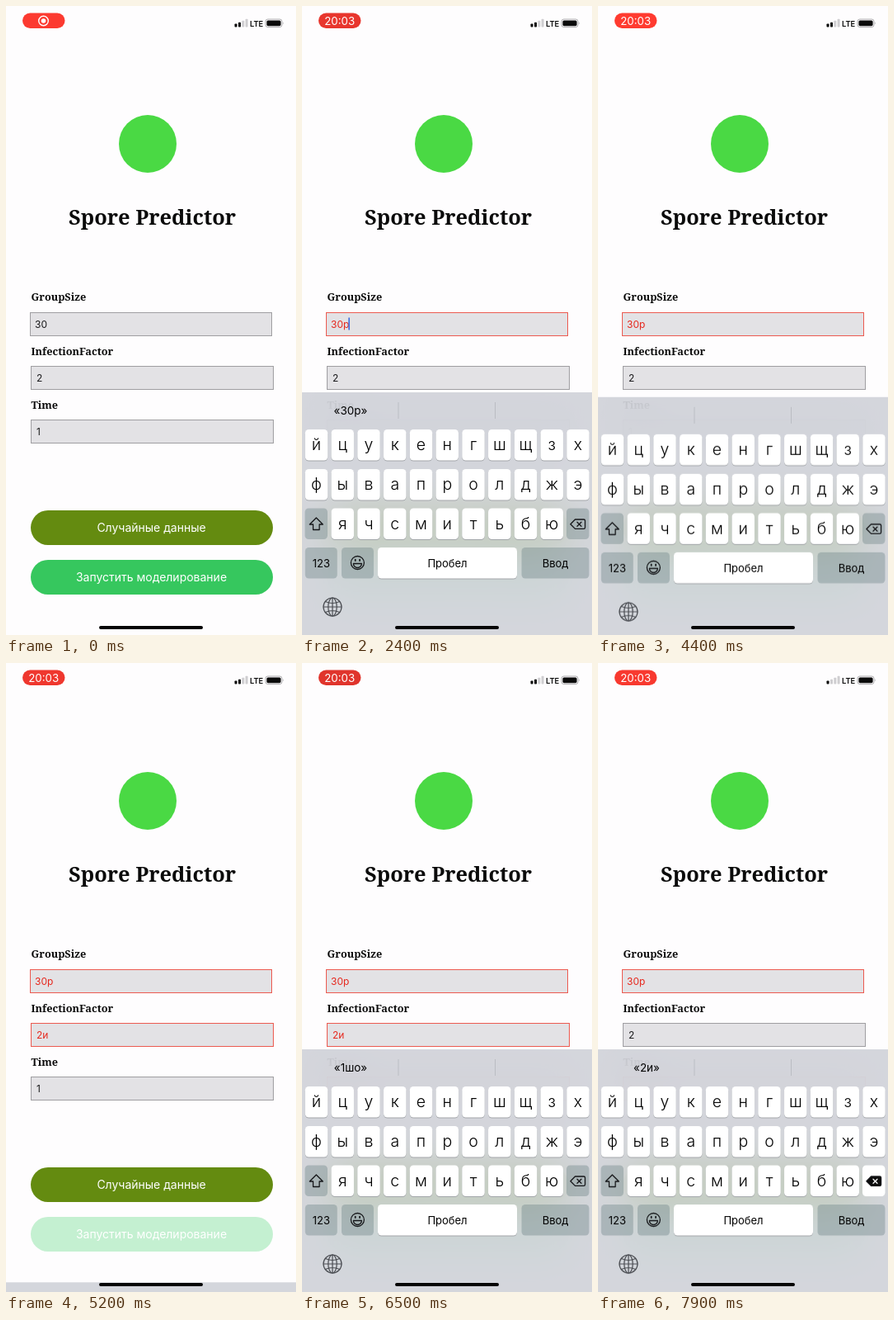
An HTML page that plays this animation: 352x762 px, repeating every 8 s.

```html
<!DOCTYPE html>
<html lang="ru">
<head>
<meta charset="utf-8">
<title>Spore Predictor</title>
<style>
  html, body { margin: 0; width: 100%; height: 100%; overflow: hidden; background: #fefdfe; }
  #stage { position: relative; width: 352px; height: 762px; overflow: hidden; background: #fefdfe; }
  svg { position: absolute; left: 0; top: 0; display: block; }
  text { font-family: Inter, Roboto, sans-serif; }
  .slab { font-family: "Noto Serif", serif; font-weight: 600; fill: #0b0b0b; }
  .label { font-size: 12.7px; }
  .mid { text-anchor: middle; }
  .field rect { fill: #e3e2e5; stroke: #9f9ea1; }
  .field text { font-size: 12px; fill: #1a1a1c; }
  .field.bad rect { stroke: #ec5a50; }
  .field.bad text { fill: #e6281e; }
  .button { font-size: 14px; fill: #fff; }
  #keyboard {
    position: absolute; left: 0; top: 468px; width: 352px; height: 294px;
    background: rgba(205, 208, 215, .86);
    -webkit-backdrop-filter: blur(26px) saturate(1.6);
    backdrop-filter: blur(26px) saturate(1.6);
  }
  .key { fill: #fff; }
  .dim { fill: rgba(104, 124, 132, .37); }
  .shade { fill: #a3a6aa; }
  .letter { font-size: 19.5px; font-weight: 350; }
  .word { font-size: 13px; }
  .line { fill: none; stroke: #16171a; stroke-width: 1.3; stroke-linejoin: round; stroke-linecap: round; }
  .globe { stroke: #4a4d52; stroke-width: 1.2; }
</style>
</head>
<body>
<div id="stage">
  <svg width="352" height="762">
    <rect id="pill" x="20" y="8.500" width="51.5" height="18.5" rx="9.2"/>
    <g id="recIcon">
      <circle cx="45.5" cy="18" r="5.8" fill="none" stroke="#fff" stroke-width="1.4"/>
      <circle cx="45.5" cy="18" r="2.8" fill="#fff"/>
    </g>
    <text id="clock" class="mid" x="45.7" y="22.700" font-size="13.3" fill="#fff">20:03</text>

    <g fill="#0b0b0b">
      <rect x="277.5" y="21.5" width="3" height="4" rx=".8"/>
      <rect id="bar2" x="282" y="19.7" width="3" height="5.8" rx=".8"/>
      <rect x="286.3" y="17.8" width="3" height="7.7" rx=".8" fill="#cfced1"/>
      <rect x="290.6" y="15.8" width="3" height="9.7" rx=".8" fill="#cfced1"/>
      <text x="296" y="25" font-size="9.3" font-weight="600">LTE</text>
      <rect x="315" y="16" width="20" height="9.6" rx="2.8" fill="none" stroke="#a4a3a6" stroke-width=".9"/>
      <rect x="316.4" y="17.4" width="17.2" height="6.8" rx="1.6"/>
      <path d="M336 19.2q1.4 1.6 0 3.2z" fill="#a4a3a6"/>
    </g>

    <circle cx="172" cy="167" r="35" fill="#4ad944"/>
    <text class="slab mid" x="177.5" y="265" font-size="25.4">Spore Predictor</text>

    <text class="slab label" x="30.5" y="357">GroupSize</text>
    <text class="slab label" x="30.5" y="423">InfectionFactor</text>
    <text class="slab label" x="30.5" y="488">Time</text>
    <g class="field"><rect x="29.5" y="371.5" width="293" height="28"/><text x="35" y="390"></text></g>
    <g class="field"><rect x="30.5" y="436.5" width="294" height="28"/><text x="37" y="455"></text></g>
    <g class="field"><rect x="30.5" y="501.5" width="294" height="28"/><text x="37" y="520"></text></g>
    <rect id="caret" width="1.6" height="15" fill="#3d6be0"/>

    <rect x="30" y="611" width="294" height="42" rx="21" fill="#648b10"/>
    <text class="button mid" x="176.5" y="637">Случайные данные</text>
    <rect id="start" x="30" y="671" width="294" height="42" rx="21"/>
    <text class="button mid" x="176.5" y="697">Запустить моделирование</text>
  </svg>

  <div id="keyboard">
    <svg width="352" height="294">
      <path d="M117 12v20M234.5 12v20" stroke="#babdc3"/>
      <text id="hint" class="mid" x="59" y="26.5" font-size="13.5"></text>
      <g id="keys"></g>
      <path class="line" d="M17.3 152l-8 8h4.2v6.5h7.6v-6.5h4.2z"/>
      <path id="eraser" class="line" d="M331.5 154h10.5q1.6 0 1.6 1.6v8.2q0 1.6-1.6 1.6h-10.5l-5.6-5.7z"/>
      <path id="cross" class="line" d="M334 157.2l5 5m0-5l-5 5"/>
      <g class="line">
        <circle cx="67.4" cy="206.5" r="8"/>
        <path d="M62.4 207.5h10a5 5 0 0 1-10 0z"/>
        <path d="M64.7 202.7v1.2M70.1 202.7v1.2" stroke-width="1.8"/>
      </g>
      <g class="line globe">
        <circle cx="37" cy="260" r="11"/>
        <ellipse cx="37" cy="260" rx="5.2" ry="11"/>
        <path d="M37 249v22M26 260h22M28.5 253.500q8.500 4 17 0M28.500 266.500q8.500-4 17 0"/>
      </g>
    </svg>
  </div>

  <svg width="352" height="762">
    <rect x="113" y="751" width="126" height="4" rx="2" fill="#050505"/>
  </svg>
</div>

<script>
const LOOP = 8000, TRAVEL = 294, SPRING = 0.02;
const $ = id => document.getElementById(id);

// Keyboard layout
let keys = '';
function addKey(x, y, w, label = '', cls = 'letter', dim = false) {
  const id = label === 'erase' ? ' id="eraseKey"' : '';
  const text = label === 'erase' ? '' : label;
  if (!dim) keys += `<rect class="shade" x="${x}" y="${y + 1}" width="${w}" height="37.5" rx="4.5"/>`;
  keys += `<rect${id} class="${dim ? 'dim' : 'key'}" x="${x}" y="${y}" width="${w}" height="37.5" rx="4.5"/>`;
  keys += `<text class="mid ${cls}" x="${x + w / 2}" y="${y + (cls === 'letter' ? 25 : 23.5)}">${text}</text>`;
}
const addRow = (letters, first, y) =>
  [...letters].forEach((c, i) => addKey(3.8 + 31.75 * (first + i), y, 27.4, c));
addRow('йцукенгшщзх', 0, 45);
addRow('фывапролджэ', 0, 93);
addRow('ячсмитьбю', 1, 140.5);
addKey(3.5, 140.5, 27.5, '', 'word', true);
addKey(321, 140.5, 27.5, 'erase', 'word', true);
addKey(3.8, 188, 39, '123', 'word', true);
addKey(48, 188, 39, '', 'word', true);
addKey(92, 188, 169, 'Пробел', 'word');
addKey(266.5, 188, 82, 'Ввод', 'word', true);
$('keys').innerHTML = keys;

// Timeline: [time, value]
const slides = [[910, 1], [2675, 0], [4108, 1], [4950, 0], [5620, 1], [6710, 0], [7350, 1]];
const values = [
  [[0, '30'], [1950, '30р']],
  [[0, '2'], [4650, '2и'], [7800, '2']],
  [[0, '1'], [6150, '1ш'], [6350, '1шо']]
];
const hints = [[0, ''], [1950, '«30р»'], [2900, ''], [4650, '«2и»'], [5400, ''],
  [6150, '«1ш»'], [6350, '«1шо»'], [7150, ''], [7400, '«2и»']];
const focus = [[0, -1], [910, 0], [2675, -1], [4450, 1], [4950, -1], [7350, 1]];
const glow = [[0, .9], [500, 1], [900, 1], [1300, 0], [2900, .5], [4400, 1],
  [5800, .2], [7100, .05], [7900, .8], [8000, .9]];

const entry = (list, t) => list.filter(p => p[0] <= t).pop();
const at = (list, t) => entry(list, t)[1];

function lerpAt(list, t) {
  const i = list.findIndex(p => p[0] > t);
  const [a, b] = [list[i - 1], list[i]];
  return a[1] + (b[1] - a[1]) * (t - a[0]) / (b[0] - a[0]);
}

// Critically damped spring towards each target in turn
function keyboardLift(t) {
  let lift = 0;
  for (const [start, target] of slides) {
    if (t < start) break;
    const end = (slides.find(s => s[0] > start) || [LOOP])[0];
    const u = (Math.min(t, end) - start) * SPRING;
    lift = target + (lift - target) * (1 + u) * Math.exp(-u);
  }
  return lift;
}

const fields = [...document.querySelectorAll('.field')];

function draw(now) {
  const t = now % LOOP;
  const g = lerpAt(glow, t);
  $('pill').style.fill = `rgb(${220 + 35 * g},${51 + 8 * g},${43 + 5 * g})`;
  const showClock = t >= 2000;
  $('clock').style.opacity = showClock ? 1 : 0;
  $('recIcon').style.opacity = showClock ? 0 : 1;
  $('bar2').style.fill = t >= 7500 ? '#cfced1' : '#0b0b0b';

  let invalid = false;
  fields.forEach((field, i) => {
    const value = at(values[i], t), bad = /\D/.test(value);
    const text = field.lastChild;
    if (text.textContent !== value) text.textContent = value;
    field.classList.toggle('bad', bad);
    invalid = invalid || bad;
  });
  $('start').style.fill = invalid ? '#c4f0d1' : '#36c75e';

  const [since, active] = entry(focus, t), caret = $('caret');
  caret.style.opacity = active >= 0 && (t - since) % 1000 < 500 ? 1 : 0;
  if (active >= 0) {
    const text = fields[active].lastChild;
    caret.setAttribute('x', +text.getAttribute('x') + text.getComputedTextLength() - 1);
    caret.setAttribute('y', +text.getAttribute('y') - 12.5);
  }

  $('keyboard').style.transform = `translateY(${TRAVEL * (1 - keyboardLift(t))}px)`;
  $('hint').textContent = at(hints, t);
  const erasing = t >= 7800;
  $('eraseKey').setAttribute('class', erasing ? 'key' : 'dim');
  $('eraser').style.fill = erasing ? '#0b0b0b' : 'none';
  $('cross').style.stroke = erasing ? '#fff' : '#16171a';
}

function tick() {
  draw(performance.now());
  requestAnimationFrame(tick);
}
tick();
</script>
</body>
</html>
```
